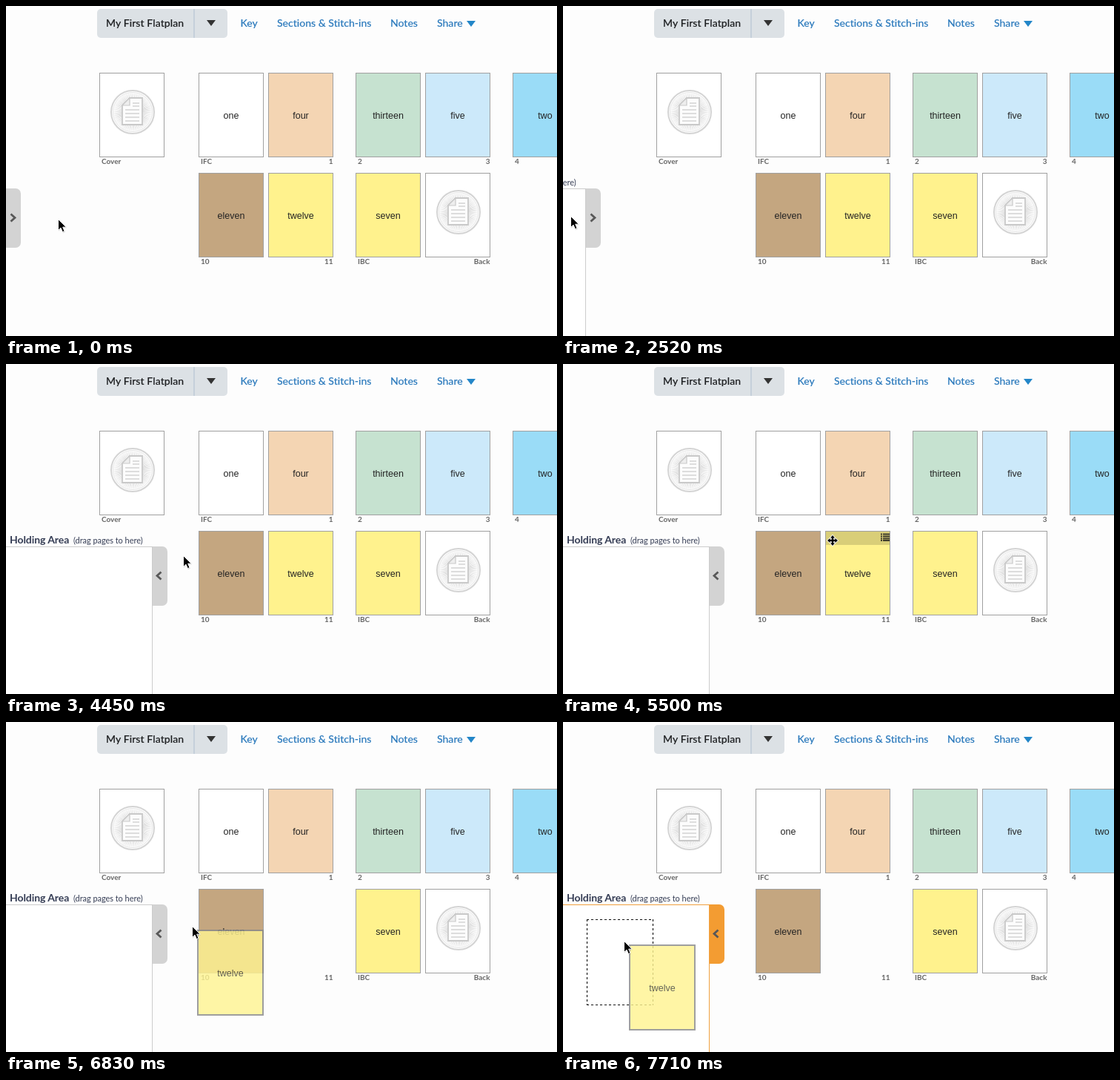
An HTML page that plays this animation: 744 by 445 pixels, repeating every 8 s.

```html
<!DOCTYPE html>
<html lang="en">
<head>
<meta charset="utf-8">
<title>Flatplan holding area</title>
<style>
  html, body { margin: 0; width: 100%; height: 100%; overflow: hidden; background: #fdfdfd; }
  svg { display: block; }
  text { font-family: Lato, sans-serif; }
  .nav { font-size: 14px; font-weight: 500; letter-spacing: .02px; fill: #2d7bbd; stroke: #2d7bbd; stroke-width: .15px; }
  .nav.title { letter-spacing: .1px; fill: #1d1f21; stroke: #1d1f21; }
  .label { font-size: 10px; font-weight: 700; fill: #666; }
  .name { font: 12.5px "Liberation Sans", Arial, sans-serif; text-anchor: middle; fill: #222; }
  .head { font-size: 14px; font-weight: 700; letter-spacing: -.08px; fill: #343c54; }
  .hint { font-size: 11px; letter-spacing: -.05px; fill: #343c54; }
  .end { text-anchor: end; }
  #panel, #tab { --line: #ccc; --body: #d3d3d3; }
  .drop #panel, .drop #tab { --line: #f0a040; --body: #f39c32; }
  .line { fill: var(--line); }
  #tab rect { fill: var(--body); }
</style>
</head>
<body>
<svg id="stage" width="744" height="445" viewBox="0 0 744 445">
  <defs>
    <radialGradient id="glow" gradientUnits="userSpaceOnUse" cx="0" cy="0" r="27">
      <stop offset=".5" stop-color="#c4c4c4"/>
      <stop offset="1" stop-color="#f6f6f6"/>
    </radialGradient>
    <g id="blank" fill="none">
      <circle r="29" stroke="#d4d4d4" stroke-width="2"/>
      <circle r="26.500" stroke="#dedede" stroke-width=".8"/>
      <circle r="13" stroke="url(#glow)" stroke-width="25" pathLength="180" stroke-dasharray="1"/>
      <path d="M-4-19H13V17H-14V-9Z" fill="#fcfcfc" stroke="#c9c9c9" stroke-width="1.800"/>
      <path d="M-4-19V-9H-14Z" fill="#eee" stroke="#c9c9c9" stroke-width="1.200"/>
      <path d="M0-12H9M0-8H9M-10-3H9M-10 2H9M-10 7H9M-10 12H9" stroke="#d2d2d2" stroke-width="1.600"/>
    </g>
    <g id="bar">
      <rect x="1" y="1" width="86" height="18" opacity=".15"/>
      <path d="M75 4.500h2m1 0h9M75 7.500h2m1 0h9M75 10.500h2m1 0h9M75 13h2m1 0h9" stroke="#403d2c" stroke-width="2"/>
    </g>
    <clipPath id="tabClip"><rect y="246" width="21" height="80"/></clipPath>
  </defs>

  <rect x="123" y="4" width="176" height="39" rx="5" fill="#dce1e5"/>
  <rect x="253" y="4" width="2" height="39" fill="#c5d0da"/>
  <path d="M271 19h12l-6 8Z" fill="#333"/>
  <path d="M622 20h12l-6 8Z" fill="#2386c8"/>
  <text class="nav title" x="135" y="28">My First Flatplan</text>
  <text class="nav" x="316.500" y="28">Key</text>
  <text class="nav" x="366" y="28">Sections &amp; Stitch-ins</text>
  <text class="nav" x="519" y="28">Notes</text>
  <text class="nav" x="582" y="28">Share</text>

  <g id="pages"></g>

  <g id="swap" transform="translate(270 244)" fill="#3a2510" opacity=".6">
    <path d="M7 0 14 9H9.500V15.500H19L23 20.500H4V9H0Z"/>
    <path d="M25 21 18 12H23V6H14L10 1H28V12H32Z"/>
  </g>

  <g id="panel">
    <rect y="247" width="197" height="198" fill="#fff"/>
    <text class="head" x="5" y="242">Holding Area</text>
    <text class="hint" x="91" y="242">(drag pages to here)</text>
    <rect class="line" y="246" width="198" height="1"/>
    <rect class="line" x="197" y="246" width="1" height="199"/>
    <path id="slot" d="M32 266.500H122M32 381.500H122M32.500 266V382M121.500 266V382" stroke="#000" stroke-dasharray="3" shape-rendering="crispEdges"/>
  </g>
  <g id="tab">
    <rect x="-20" y="246" width="40" height="80" rx="7" clip-path="url(#tabClip)"/>
    <path id="chevron" fill="none" stroke="#585858" stroke-width="2.800"/>
  </g>

  <g id="ghost" opacity=".82">
    <rect x="1" y="1" width="88" height="114" fill="#fff492" stroke="#8a8a8a" stroke-width="2"/>
    <text class="name" x="45" y="63" fill-opacity=".85">twelve</text>
  </g>

  <g id="arrow">
    <path d="M1 .500V15.500L4.500 12.200 7 18 9.800 16.800 7.400 11.300H12Z" opacity=".18"/>
    <path d="M.500-.500V14.500L4 11.200 6.400 16.700 9 15.600 6.700 10.200H11.300Z" stroke="#fff"/>
  </g>
  <path id="move" d="M0-7 3-3.500H1.200V-1.200H3.500V-3L7 0 3.500 3V1.200H1.200V3.500H3L0 7-3 3.500H-1.200V1.200H-3.500V3L-7 0-3.500-3V-1.200H-1.200V-3.500H-3Z"
    stroke="#fff" stroke-width="1.600" paint-order="stroke"/>
</svg>
<script>
const LOOP = 8000, TICK = 145, OPEN = 2520, LIFT = 5950, CARRY = 6250, PANEL = 198;
const $ = id => document.getElementById(id);

const linear = p => p;
const easeOut = p => 1 - (1 - p) ** 2;
const smooth = p => p * p * (3 - 2 * p);

// Slot 0 holds the cover; the others stand in spreads of two.
const slotX = i => i ? 260 + 212 * (i - 1 >> 1) + 94 * (i - 1 & 1) : 126;

function page(y, slot, label, name, fill = '#fff') {
  const right = slot && slot % 2 === 0;
  return `<g transform="translate(${slotX(slot)} ${y})">
    <g id="${name || label}">
      <rect x=".5" y=".5" width="87" height="113" fill="${fill}" stroke="#a0a0a0"/>
      ${name ? `<text class="name" x="44" y="62">${name}</text>` : '<use href="#blank" x="45" y="53"/>'}
      <use class="bar" href="#bar" visibility="hidden"/>
    </g>
    <text class="label ${right ? 'end' : ''}" x="${right ? 87.5 : 3}" y="123">${label}</text>
  </g>`;
}

$('pages').innerHTML = [
  page(90, 0, 'Cover'),
  page(90, 1, 'IFC', 'one'),
  page(90, 2, '1', 'four', '#f4d5b3'),
  page(90, 3, '2', 'thirteen', '#c6e2d0'),
  page(90, 4, '3', 'five', '#cce9fa'),
  page(90, 5, '4', 'two', '#9adcf7'),
  page(225, 1, '10', 'eleven', '#c4a680'),
  page(225, 2, '11', 'twelve', '#fff28d'),
  page(225, 3, 'IBC', 'seven', '#fff28d'),
  page(225, 4, 'Back')
].join('');

// Pointer moves: first tick, number of ticks, end point, easing
const moves = [
  [450, 3, 40, 287, linear],
  [1050, 2, 45, 283, linear],
  [1490, 2, 12, 283, linear],
  [1930, 2, 10, 284, linear],
  [3870, 8, 345, 247, smooth],
  [5050, 4, 364, 238, easeOut],
  [CARRY, 3, 329, 260, linear],
  [6685, 4, 173, 291, linear],
  [7270, 4, 82, 296, easeOut]
];

// Progress that advances in whole ticks, from 0 to 1
function progress(t, first, ticks) {
  const done = Math.floor((t - first) / TICK) + 1;
  return Math.min(Math.max(done / ticks, 0), 1);
}

function pointer(t) {
  let x = 70, y = 288;
  for (const [first, ticks, endX, endY, ease] of moves) {
    const p = ease(progress(t, first, ticks));
    x += (endX - x) * p;
    y += (endY - y) * p;
  }
  return [Math.round(x), Math.round(y)];
}

const show = (el, on) => el.setAttribute('visibility', on ? 'visible' : 'hidden');
const place = (id, x, y) => $(id).setAttribute('transform', `translate(${x} ${y})`);
const hoverBar = name => $(name).querySelector('.bar');

function draw(t) {
  const [x, y] = pointer(t);
  const out = Math.round(PANEL * smooth(progress(t, OPEN, 4)));
  const lifted = t >= LIFT, carried = t >= CARRY;
  const over = slot => x >= slotX(slot) && x < slotX(slot) + 88 && y >= 225 && y < 339;
  const swap = carried && over(1);
  const drop = carried && x < PANEL + 20;
  const grip = !carried && over(2) && y < 245;

  show(hoverBar('eleven'), !lifted && over(1));
  show(hoverBar('twelve'), !lifted && over(2));
  show($('twelve'), !lifted);
  $('eleven').setAttribute('opacity', swap ? .6 : 1);
  show($('swap'), swap);

  show($('panel'), out > 0);
  place('panel', out - PANEL, 0);
  place('tab', out, 0);
  $('chevron').setAttribute('d', out === PANEL ? 'M11.5 280.5 6 285.5 11.500 290.5' : 'M6.5 280.5 12 285.5 6.5 290.5');
  $('stage').classList.toggle('drop', drop);
  show($('slot'), drop);

  show($('ghost'), lifted);
  place('ghost', carried ? x + 7 : 353, carried ? y + 4 : 224);

  show($('move'), grip);
  show($('arrow'), !grip);
  place('move', x, y);
  place('arrow', x, y);
}

const start = performance.now();
function frame() {
  draw((performance.now() - start) % LOOP);
  requestAnimationFrame(frame);
}
frame();
</script>
</body>
</html>
```
